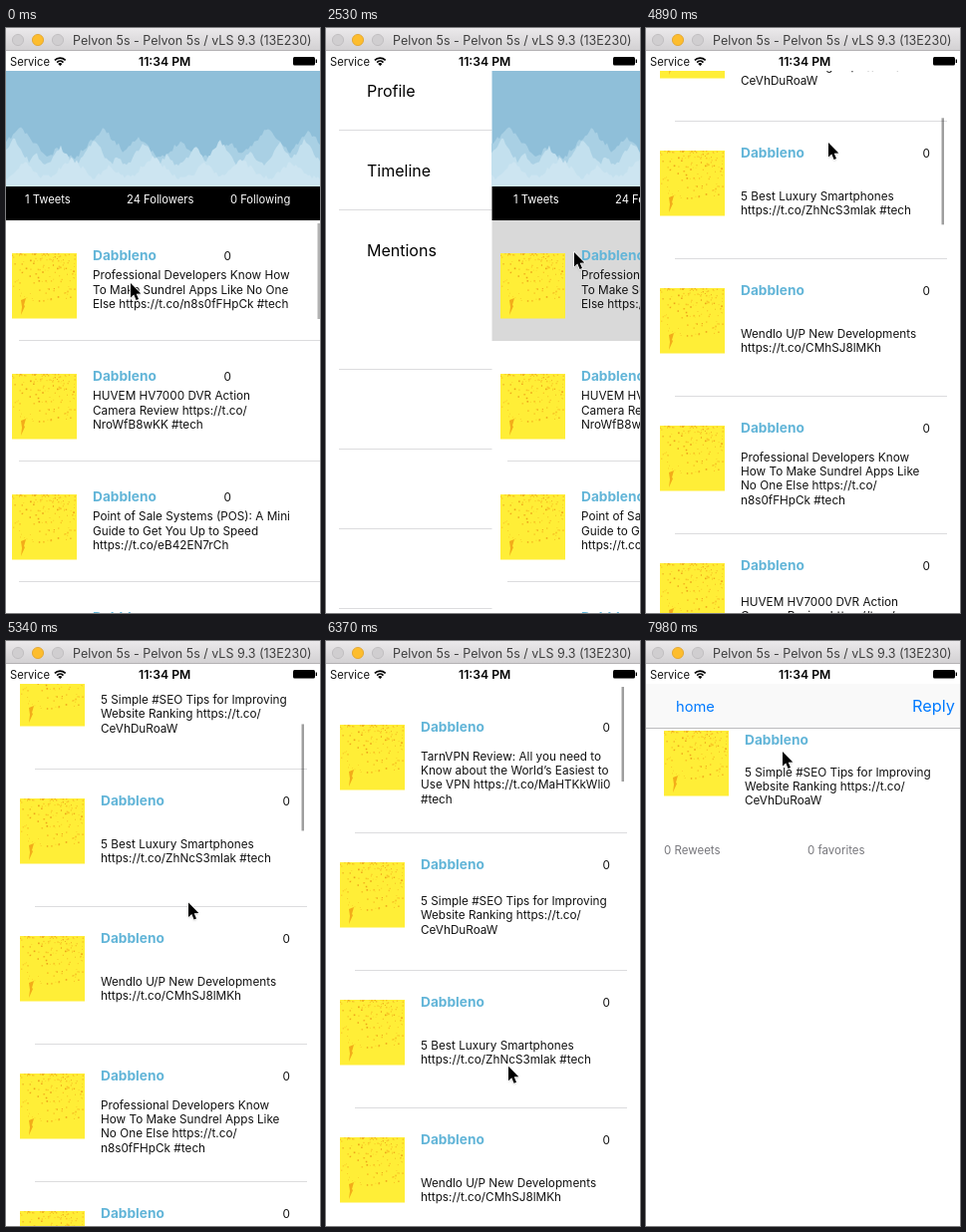
An HTML page with a canvas that plays this animation: 315x587 px, repeating every 8 s.

```html
<!DOCTYPE html>
<html lang="en">
<head>
<meta charset="utf-8">
<title>Timeline app demo</title>
<style>
html, body { margin: 0; width: 100%; height: 100%; overflow: hidden; background: #fff; }
canvas { display: block; width: 315px; height: 587px; }
</style>
</head>
<body>
<canvas id="stage"></canvas>
<script>
const W = 315, H = 587, LOOP = 8000, STEP = 147.75;
const FONT = 'Inter, Roboto, "Liberation Sans", sans-serif';
const BLUE = '#62b5d8', LINE = '#dcdcde', PRESSED = '#d9d9d9';
const AUTHOR = 'Dabbleno';
const canvas = document.getElementById('stage');
const dpr = window.devicePixelRatio || 1;
canvas.width = Math.round(W * dpr);
canvas.height = Math.round(H * dpr);
const c = canvas.getContext('2d');

// Tracks are [step, value...] keys, linear in between.
const cursorTrack = [
  [0, 125, 256], [1, 112, 254], [3, 55, 244], [4, 47, 243], [5, 68, 242], [11, 68, 242],
  [12, 118, 233], [14, 118, 233], [15, 140, 232], [17, 249, 225], [18, 262, 222], [19, 262, 215],
  [22, 115, 145], [23, 109, 142], [26, 109, 142], [28, 160, 290], [29, 183, 340], [30, 183, 340],
  [33, 183, 115], [34, 183, 100], [35, 183, 150], [39, 183, 600], [41, 183, 620],
  [44, 183, 330], [46, 184, 215], [50, 184, 215], [53, 130, 156], [54, 137, 111]
];
const paneTrack = [[14, 0], [15, 20], [17, 169], [18, 178], [26, 178], [27, 80], [28, 12], [29, 0]];
const scrollTrack = [
  [28, -28.5], [29, 0], [30, 0], [31, 50], [33, 225], [34, 262], [35, 270], [36, 190],
  [37, 60], [38, -30], [39, -80], [40, -106], [41, -100], [42, -45], [43, -12], [44, 0]
];
const pushTrack = [[48, 1], [49, 0.55], [50, 0.12], [51, 0]];
const barTrack = [[29, 0], [31, 1], [43, 1], [45, 0]];

const homePosts = [
  ['Professional Developers Know How', 'To Make Sundrel Apps Like No One', 'Else https://t.co/n8s0fFHpCk #tech'],
  ['HUVEM HV7000 DVR Action', 'Camera Review https://t.co/', 'NroWfB8wKK #tech'],
  ['Point of Sale Systems (POS): A Mini', 'Guide to Get You Up to Speed', 'https://t.co/eB42EN7rCh'],
  ['']
];
const posts = [
  ['TarnVPN Review: All you need to', 'Know about the World’s Easiest to', 'Use VPN https://t.co/MaHTKkWli0', '#tech'],
  ['5 Simple #SEO Tips for Improving', 'Website Ranking https://t.co/', 'CeVhDuRoaW'],
  ['5 Best Luxury Smartphones', 'https://t.co/ZhNcS3mlak #tech'],
  ['Wendlo U/P New Developments', 'https://t.co/CMhSJ8lMKh'],
  ['Professional Developers Know', 'How To Make Sundrel Apps Like', 'No One Else https://t.co/', 'n8s0fFHpCk #tech'],
  homePosts[1],
  homePosts[2]
];

function at(track, n) {
  if (n <= track[0][0]) return track[0].slice(1);
  for (let i = 1; i < track.length; i++) {
    const a = track[i - 1], b = track[i];
    if (n <= b[0]) {
      const k = (n - a[0]) / (b[0] - a[0]);
      return a.slice(1).map((v, j) => v + (b[j + 1] - v) * k);
    }
  }
  return track[track.length - 1].slice(1);
}

function rng(seed) {
  return () => (seed = (seed * 16807) % 2147483647) / 2147483647;
}

function rect(x, y, w, h, color) {
  c.fillStyle = color;
  c.fillRect(x, y, w, h);
}

function text(s, x, y, size = 11.75, color = '#111', weight = 400) {
  c.font = `${weight} ${size}px ${FONT}`;
  c.fillStyle = color;
  c.fillText(s, x, y);
}

function poly(points, color) {
  c.beginPath();
  points.forEach(([x, y]) => c.lineTo(x, y));
  c.closePath();
  c.fillStyle = color;
  c.fill();
}

function clipped(x, y, w, h, draw) {
  c.save();
  c.beginPath();
  c.rect(x, y, w, h);
  c.clip();
  draw();
  c.restore();
}

function avatar(x, y) {
  rect(x, y, 65, 65.5, '#ffee37');
  const rnd = rng(77);
  for (let i = 0; i < 150; i++) {
    const px = rnd() * 63, py = Math.pow(rnd(), 1.6) * 48, s = 0.6 + rnd() * 1.1;
    rect(x + px, y + py, s, s, i % 3 ? '#f8c526' : '#eda51c');
  }
  poly([[x + 9, y + 47], [x + 14, y + 45], [x + 12, y + 52], [x + 13, y + 53], [x + 9, y + 62], [x + 10, y + 54]], '#f3ac1a');
}

// Jagged ridge: the nearest peak sets the height, noise roughens it.
function ridge(peaks, slope, floor, color, seed) {
  const rnd = rng(seed), pts = [[-3, 159]];
  for (let x = -3; x <= W; x += 2) {
    const y = Math.min(floor, ...peaks.map(([px, py]) => py + Math.abs(x - px) * slope));
    pts.push([x, y + rnd() * 5 - 1]);
  }
  pts.push([W, 159]);
  poly(pts, color);
}

function banner() {
  rect(-2.5, 43, W + 3, 116, '#8fbfd9');
  ridge([[14, 98], [52, 119], [97, 99], [132, 107], [175, 111], [225, 113], [262, 99], [304, 102]], 1.1, 128, '#a9d0e4', 11);
  ridge([[8, 110], [30, 124], [55, 118], [88, 110], [112, 126], [138, 113], [162, 124], [190, 117],
    [215, 111], [245, 122], [275, 113], [300, 110]], 1.5, 134, '#c3e0ee', 23);
  ridge([[18, 133], [66, 129], [104, 136], [148, 128], [200, 134], [236, 130], [286, 133]], 0.9, 148, '#cde5f1', 41);
  rect(-2.5, 159, W + 3, 34, '#000');
  text('1 Tweets', 19, 175.5, 11.2, '#fff');
  text('24 Followers', 121, 175.5, 11.2, '#fff');
  text('0 Following', 225, 175.5, 11.2, '#fff');
}

function home(n) {
  rect(-2.5, 43, W + 3, H, '#fff');
  banner();
  homePosts.forEach((lines, i) => {
    const y = 193 + i * 121;
    if (i === 0 && n >= 8) rect(-2.5, y, W + 3, 121, PRESSED);
    else rect(13, y + 120, W, 1, LINE);
    avatar(6, y + 33);
    text(AUTHOR, 87, y + 39.5, 13.7, BLUE, 700);
    text('0', 218.5, y + 39.5);
    lines.forEach((s, k) => text(s, 87, y + 59.3 + k * 14.3));
  });
  const fade = Math.max(0, 1 - n / 5);
  if (fade) rect(312.5, 196, 2.5, 96, `rgba(0,0,0,${0.3 * fade})`);
}

function timeline(n) {
  const scroll = at(scrollTrack, n)[0], loaded = n >= 28;
  rect(-2, 43, W + 2, H, '#fff');
  for (let i = 0; i < 20; i++) {
    const y = 43 + i * 138 - scroll;
    if (y > H || y < -138) continue;
    const lines = loaded ? posts[i % posts.length] : ['Text'];
    const pressed = i === 1 && n >= 46;
    if (pressed) rect(14, y, 288, 138, PRESSED);
    else if (!(i === 0 && n >= 46)) rect(29, y + 137, 273, 1, LINE);
    if (loaded) avatar(14, y + 29);
    text(loaded ? AUTHOR : 'Username', 95, y + 36, loaded ? 13.7 : 13.4, BLUE, 700);
    text('0', 277.5, y + 36);
    const top = y + 86.3 - (lines.length - 1) * 7.15;
    lines.forEach((s, k) => text(s, 95, top + k * 14.3));
  }
  const alpha = at(barTrack, n)[0];
  if (alpha) {
    const h = Math.max(7, 107 - Math.max(0, -scroll));
    rect(296.5, 46 + Math.max(0, scroll) * 0.197, 2.5, h, `rgba(0,0,0,${0.38 * alpha})`);
  }
}

function menu(n) {
  rect(0, 43, W, H, '#fff');
  if (n >= 23) {
    rect(0, 102, 200, 81, '#dadada');
    rect(0, 102, 41, 81, '#dddddd');
  }
  for (let i = 0; i < 7; i++) {
    if (i === 2 && n < 18) continue;
    rect(13, 102 + i * 80, 200, 1, LINE);
  }
  ['Profile', 'Timeline', 'Mentions'].forEach((s, i) => text(s, 41, 69 + i * 80, 16, '#000'));
}

function detail() {
  rect(0, 43, W, H, '#fff');
  rect(0, 43, W, 44, '#f9f9f9');
  rect(0, 87, W, 1, '#bcbcbe');
  text('home', 30, 71, 14.7, '#007aff');
  text('Reply', 267, 71, 16.3, '#007aff');
  avatar(18, 90);
  text(AUTHOR, 99, 103.5, 13.7, BLUE, 700);
  posts[1].forEach((s, k) => text(s, 99, 135.8 + k * 14.3));
  text('0 Reweets', 18, 213.5, 11.5, '#77777c');
  text('0 favorites', 162, 213.5, 11.5, '#77777c');
}

function chrome() {
  const g = c.createLinearGradient(0, 0, 0, 22);
  g.addColorStop(0, '#ebe9eb');
  g.addColorStop(1, '#d3d1d3');
  rect(0, 0, W, 22, g);
  rect(0, 22, W, 1, '#b4b2b4');
  [[12, '#d0ced0', '#bbb9bb'], [32, '#fdbd2e', '#e0a128'], [52, '#d0ced0', '#bbb9bb']].forEach(([x, fill, edge]) => {
    c.beginPath();
    c.arc(x, 12, 5.6, 0, 7);
    c.fillStyle = fill;
    c.fill();
    c.lineWidth = 0.8;
    c.strokeStyle = edge;
    c.stroke();
  });
  text('Pelvon 5s - Pelvon 5s / vLS 9.3 (13E230)', 67, 17, 12.5, '#3e3e3e');

  rect(0, 23, W, 20, '#fff');
  text('Service', 4, 37.5, 11.2, '#111');
  text('11:34 PM', 133, 37.5, 12.2, '#000', 600);
  c.strokeStyle = '#000';
  c.lineWidth = 1.7;
  [4.3, 7.4].forEach(r => {
    c.beginPath();
    c.arc(54.3, 37.5, r, -Math.PI * 0.76, -Math.PI * 0.24);
    c.stroke();
  });
  c.beginPath();
  c.moveTo(54.3, 38);
  c.arc(54.3, 38, 2.9, -Math.PI * 0.76, -Math.PI * 0.24);
  c.fillStyle = '#000';
  c.fill();
  c.beginPath();
  c.roundRect(288, 29, 22, 8.5, 1.5);
  c.fill();
  rect(310.7, 31.5, 1.3, 3.5, '#000');
}

function cursor(x, y) {
  c.save();
  c.translate(x, y);
  c.shadowColor = 'rgba(0,0,0,0.35)';
  c.shadowBlur = 2 * dpr;
  c.shadowOffsetY = dpr;
  const arrow = [[0, 0], [0, 14.5], [3.3, 11.5], [5.6, 17], [8, 16], [5.7, 10.7], [10.3, 10.5]];
  poly(arrow, '#000');
  c.shadowColor = 'transparent';
  c.lineWidth = 1.6;
  c.lineJoin = 'round';
  c.strokeStyle = '#fff';
  c.stroke();
  poly(arrow, '#000');
  c.restore();
}

function shifted(x, draw) {
  c.save();
  c.translate(x, 0);
  draw();
  c.restore();
}

function render(ms) {
  const n = Math.floor(ms / STEP);
  const pane = at(paneTrack, n)[0], push = at(pushTrack, n)[0];
  c.setTransform(dpr, 0, 0, dpr, 0, 0);
  rect(0, 0, W, H, '#fff');
  clipped(0, 43, W, H - 43, () => {
    if (pane > 0) menu(n);
    if (push > 0) shifted(pane - (1 - push) * W * 0.3, () => (n < 24 ? home : timeline)(n));
    if (push < 1) shifted(push * W, detail);
  });
  chrome();
  cursor(...at(cursorTrack, n));
}

const start = performance.now();
function tick() {
  render((performance.now() - start) % LOOP);
  requestAnimationFrame(tick);
}
tick();
</script>
</body>
</html>
```
